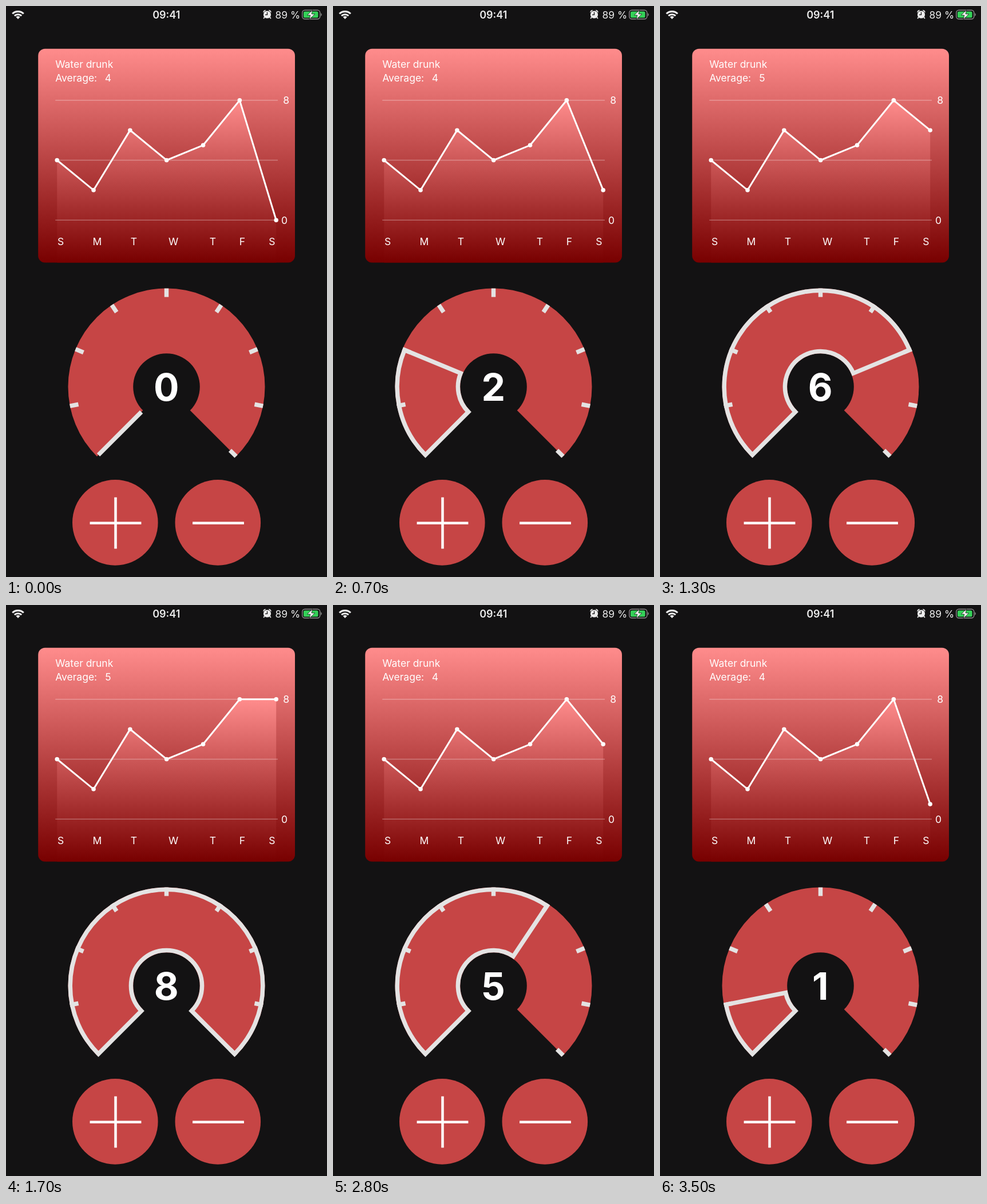
Animation, 561 px wide and 998 px high, one loop 3600 ms. Source, as an HTML page:

```html
<!DOCTYPE html>
<html lang="en">
<head>
<meta charset="utf-8">
<title>Water tracker</title>
<style>
  html, body { margin: 0; width: 100%; height: 100%; overflow: hidden; background: #131213; }
  svg { display: block; width: 100%; height: 100%; }
  text { font: 17.5px Inter, sans-serif; fill: #fff; }
  .mid { text-anchor: middle; }
  .time { font-size: 18px; font-weight: 600; }
  .status, .status text { fill: #ececec; }
  .count { font-size: 66px; font-weight: 700; }
  .grid { stroke: #fff; stroke-opacity: .3; stroke-width: 1.5; }
  .sign { stroke: #fff; stroke-width: 4.5; }
  .red { fill: #c64545; }
</style>
</head>
<body>
<svg viewBox="0 0 561 998">
  <defs>
    <linearGradient id="cardFill" gradientUnits="userSpaceOnUse" x1="0" y1="75" x2="0" y2="448.5">
      <stop stop-color="#ff8c8c"/><stop offset="1" stop-color="#780000"/>
    </linearGradient>
    <linearGradient id="areaFill" href="#cardFill" y1="164.8"/>
  </defs>

  <g class="status">
    <g fill="none" stroke="#ececec" stroke-width="3.1">
      <path d="M11.2 13.5a14.2 14.2 0 0 1 19.6 0"/>
      <path d="M14.8 17.2a9 9 0 0 1 12.4 0"/>
    </g>
    <path d="M17.4 19.3a5.2 5.2 0 0 1 7.2 0L21 23z"/>
    <text class="mid time" x="280.3" y="22">09:41</text>
    <circle cx="456.5" cy="15" r="6.6"/>
    <path d="M449.4 11.8a4 4 0 0 1 5-4.6zM463.6 11.8a4 4 0 0 0-5-4.6z"/>
    <path d="M451.8 19.5l-1.6 2.5M461.2 19.5l1.6 2.5" stroke="#ececec" stroke-width="1.8"/>
    <path d="M456.5 10.8v4.6h-3.6" fill="none" stroke="#131213" stroke-width="1.3"/>
    <text x="470.5" y="22">89 %</text>
    <rect x="517.8" y="7.2" width="31" height="15.6" rx="4.5" fill="none" stroke="#8b8b8b" stroke-width="1.4"/>
    <rect x="520" y="9.4" width="25.6" height="11.2" rx="2.6" fill="#34d158"/>
    <path d="M550.3 12.2a3.2 3.2 0 0 1 0 5.6z" fill="#8b8b8b"/>
    <path d="M535.8 7l-9.4 9h5.6l-2 7.4 9.8-9.4h-5.8z" fill="#fff" stroke="#131213" stroke-width=".8"/>
  </g>

  <rect x="56.2" y="74.8" width="448.8" height="373.8" rx="12" fill="url(#cardFill)"/>
  <path id="area" fill="url(#areaFill)"/>
  <path class="grid" d="M86.2 164.8H475M86.2 269.5H475M86.2 374.2H475"/>
  <path id="curve" fill="none" stroke="#fff" stroke-width="3"/>
  <g id="dots" fill="#fff"></g>
  <text x="86.2" y="108.4">Water drunk</text>
  <text x="86.2" y="132.4">Average:</text>
  <text id="average" class="mid" x="178.5" y="132.4"></text>
  <text class="mid" x="489.7" y="171">8</text>
  <text class="mid" x="486.6" y="380.6">0</text>
  <g id="days"></g>

  <path class="red" d="M158.9 787.2A172 172 0 1 1 402.1 787.2L321.7 706.8A58.3 58.3 0 1 0 239.3 706.8z"/>
  <path id="outline" fill="none" stroke="#e4e3e3" stroke-width="7.48"/>
  <g id="ticks" fill="#e4e3e3"></g>
  <text id="count" class="mid count" x="280.3" y="690"></text>

  <circle class="red" cx="190.8" cy="902.9" r="74.8"/>
  <circle class="red" cx="370.3" cy="902.9" r="74.8"/>
  <path class="sign" d="M146.6 903.7H236.4M191.5 858.8V948.6M326.1 903.7H415.9"/>
</svg>
<script>
const LOOP = 3600, GLASSES = 8, CX = 280.5, CY = 665.6;
const OUTER = 168.3, INNER = 62.1;
const START = Math.PI * .75, STEP = Math.PI * 1.5 / GLASSES;
const week = [4, 2, 6, 4, 5, 8];

const $ = id => document.getElementById(id);
const graphX = i => 89.2 + i * 63.83;
const graphY = v => 374.2 - v * 26.18;

$('days').innerHTML = [95.5, 159.5, 223.5, 292.5, 361.5, 413, 464.8]
  .map((x, i) => `<text class="mid" x="${x}" y="418.3">${'SMTWTFS'[i]}</text>`).join('');

for (let i = 1; i <= GLASSES; i++) {
  const deg = (START + STEP * i) * 180 / Math.PI;
  $('ticks').innerHTML +=
    `<rect x="157" y="-3.74" width="15" height="7.48" transform="translate(${CX} ${CY}) rotate(${deg})"/>`;
}

// Taps on plus, then on minus, at a steady pace
function countAt(t) {
  const taps = (from, gap, max) => Math.max(0, Math.min(max, Math.floor((t - from) / gap) + 1));
  return taps(400, 180, 8) - taps(2300, 190, 7);
}

function polar(r, a) {
  return `${CX + r * Math.cos(a)} ${CY + r * Math.sin(a)}`;
}

function outlinePath(n) {
  if (!n) return `M${polar(OUTER, START)}L${polar(INNER, START)}`;
  const end = START + STEP * n, large = STEP * n > Math.PI ? 1 : 0;
  return `M${polar(OUTER, START)}A${OUTER} ${OUTER} 0 ${large} 1 ${polar(OUTER, end)}` +
    `L${polar(INNER, end)}A${INNER} ${INNER} 0 ${large} 0 ${polar(INNER, START)}z`;
}

function draw(n) {
  const values = [...week, n];
  const points = values.map((v, i) => [graphX(i), graphY(v)]);
  const line = 'M' + points.join('L');
  $('curve').setAttribute('d', line);
  $('area').setAttribute('d', `${line}V448.5H${graphX(0)}z`);
  $('dots').innerHTML = points.map(([x, y]) => `<circle cx="${x}" cy="${y}" r="3.74"/>`).join('');
  $('average').textContent = Math.floor(values.reduce((a, b) => a + b) / values.length);
  $('outline').setAttribute('d', outlinePath(n));
  $('count').textContent = n;
}

let shown = -1;
function frame() {
  const n = countAt(performance.now() % LOOP);
  if (n !== shown) draw(shown = n);
  requestAnimationFrame(frame);
}
frame();
</script>
</body>
</html>
```
